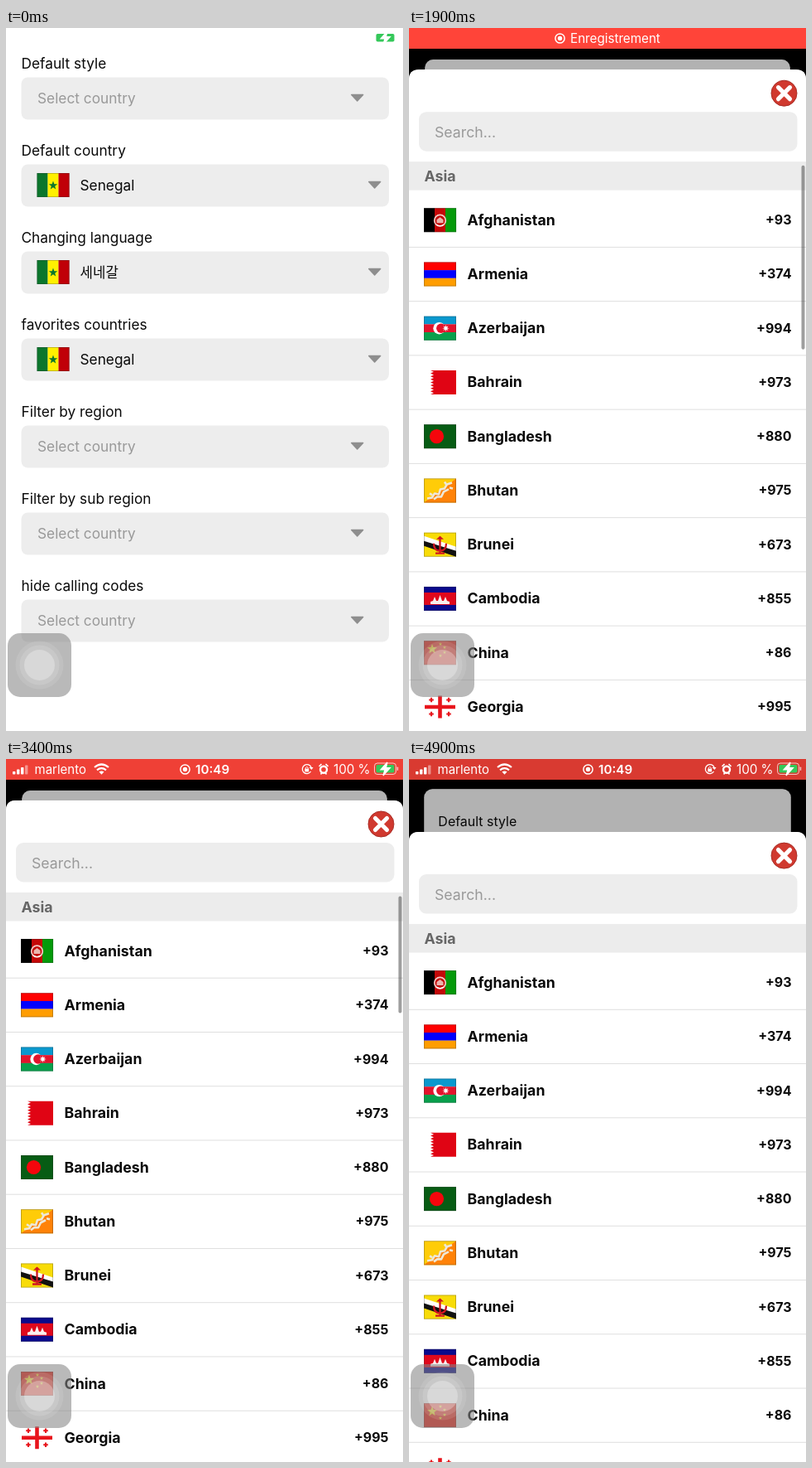
An HTML page that plays this animation: 480 px wide and 848 px high, repeating every 5 s.

```html
<!DOCTYPE html>
<html lang="en">
<head>
<meta charset="utf-8">
<title>Country picker</title>
<style>
html, body { margin: 0; width: 100%; height: 100%; overflow: hidden; background: #000; }
svg { display: block; }
#stage { width: 100vw; height: 100vh; }
text { font-family: Inter, "Noto Sans CJK KR", "Noto Sans CJK", sans-serif; white-space: pre; }
</style>
</head>
<body>
<svg id="stage" viewBox="0 0 480 848"></svg>
<script>
const LOOP = 5000, STEP = 100, TOP = 50, HEIGHT = 848, PITCH = 65.25;
const clamp = v => Math.max(0, Math.min(1, v));
const $ = id => document.getElementById(id);

// SVG helpers
const rect = (x, y, w, h, fill, more = '') => `<rect x="${x}" y="${y}" width="${w}" height="${h}" fill="${fill}" ${more}/>`;
const disc = (x, y, r, fill, more = '') => `<circle cx="${x}" cy="${y}" r="${r}" fill="${fill}" ${more}/>`;
const path = (d, fill, more = '') => `<path d="${d}" fill="${fill}" ${more}/>`;
const line = (d, color, width, more = '') => path(d, 'none', `stroke="${color}" stroke-width="${width}" ${more}`);
const text = (x, y, s, size, fill, more = '') => `<text x="${x}" y="${y}" font-size="${size}" fill="${fill}" ${more}>${s}</text>`;
const group = (body, more = '') => `<g ${more}>${body}</g>`;
const SEMI = 'font-weight="600"', BOLD = 'font-weight="700"';

// Flags on a 39 x 29 field
const W = 39, H = 29;
const columns = (...c) => c.map((f, i) => rect(i * W / c.length, 0, W / c.length + .1, H, f)).join('');
const bands = (...c) => c.map((f, i) => rect(0, i * H / c.length, W, H / c.length + .1, f)).join('');
const star = (x, y, r, fill, n = 5) => {
  let d = '';
  for (let i = 0; i < 2 * n; i++) {
    const a = Math.PI * i / n, k = i % 2 ? r * .42 : r;
    d += `${i ? 'L' : 'M'}${x + k * Math.sin(a)} ${y - k * Math.cos(a)}`;
  }
  return path(d + 'Z', fill);
};
const plus = (x, y, r, w) => line(`M${x - r} ${y}h${2 * r}M${x} ${y - r}v${2 * r}`, '#e8141c', w);
const teeth = () => {
  let d = 'M39 0H8';
  for (let i = 0; i < 8; i++) d += `l4 ${H / 16}l-4 ${H / 16}`;
  return path(d + 'H39Z', '#e00414');
};
const flags = {
  Senegal: columns('#0b762c', '#fff000', '#c00008') + star(19.5, 15, 5.5, '#0b762c'),
  Afghanistan: columns('#000', '#c40808', '#059a0a') +
    disc(19.5, 15, 6.8, 'none', 'stroke="#f3c9c4" stroke-width="1.7"') +
    path('M15.5 18v-4l4-3 4 3v4z', '#eab5ae') + line('M15 20q4.5 3 9 0', '#fff', 1.2),
  Armenia: bands('#f00', '#00f', '#ff9d00'),
  Azerbaijan: bands('#0a98ce', '#e3142c', '#08a04c') + disc(18.5, 14.5, 7.2, '#fff') +
    disc(20.8, 14.5, 5.7, '#e3142c') + star(26.5, 14.5, 4.2, '#fff', 8),
  Bahrain: teeth(),
  Bangladesh: rect(0, 0, W, H, '#075c14') + disc(15.5, 14.5, 8.6, '#f5060c'),
  Bhutan: rect(0, 0, W, H, '#ffcc08') + path('M39 0V29H0Z', '#ff8208') +
    line('M4 24l6-1 3-5 5 1 2-6 5-1 3-5 6-2M12 25l4-3 5 0 3-6 6-3M10 20l-3-2M27 7l-2-3M31 11l4 1', '#eee8d8', 2.6, 'stroke-linejoin="round"'),
  Brunei: rect(0, 0, W, H, '#f8dc08') + path('M0 4L39 17V24L0 11Z', '#fff') + path('M0 10L39 22V29L0 16Z', '#111') +
    line('M12 13q0 9 7.5 9t7.5-9M19.5 5v19M14 25h11', '#cf1620', 2.3) + path('M15 8l4.5-4 4.5 4z', '#cf1620'),
  Cambodia: rect(0, 0, W, H, '#0a0a8c') + rect(0, 7, W, 15, '#e0081c') +
    path('M8 21v-3l3-1 2-5 2 5h2l2.5-7 2.5 7h2l2-5 2 5 3 1v3z', '#f8eeee'),
  China: rect(0, 0, W, H, '#f02414') + star(10, 10, 6.3, '#ffdc10') +
    [[20, 4], [25, 8], [25, 14], [20, 18]].map(([x, y]) => star(x, y, 2.2, '#ffdc10')).join(''),
  Georgia: rect(0, 0, W, H, '#fff') + line('M1 14.5h37M19.5 1v27', '#e8141c', 4.6) +
    [[9, 6], [30, 6], [9, 23], [30, 23]].map(([x, y]) => plus(x, y, 2.8, 2.1)).join(''),
  'Hong Kong': rect(0, 0, W, H, '#d8141c') + star(19.5, 14.5, 7, '#fff')
};
const flag = (name, x, y) => {
  const edge = /Bahrain|Georgia/.test(name) ? '' : rect(.4, .4, W - .8, H - .8, 'none', 'stroke="#333" stroke-opacity=".35" stroke-width=".8"');
  return group(flags[name] + edge, `transform="translate(${x} ${y})"`);
};

// Form
const arrow = (x, y) => path(`M${x - 7} ${y - 4}h14l-7 7.5z`, '#8e8e8e', 'stroke="#8e8e8e" stroke-width="1.4" stroke-linejoin="round"');
const chosen = (name, y, label = name) =>
  flag(name, 37.5, y + 10.5) + text(89.5, y + 31.8, label, label === name ? 17.3 : 16.8, '#0a0a0a') + arrow(445.7, y + 25);
const empty = y => text(38, y + 31.8, 'Select country', 17.3, '#999') + arrow(424.7, y + 25);
const fields = [
  ['Default style', y => group(empty(y), 'id="before"') + group(chosen('Azerbaijan', y), 'id="after"')],
  ['Default country', y => chosen('Senegal', y)],
  ['Changing language', y => chosen('Senegal', y, '세네갈')],
  ['favorites countries', y => chosen('Senegal', y)],
  ['Filter by region', empty],
  ['Filter by sub region', empty],
  ['hide calling codes', empty]
];
const form = rect(0, 0, 480, HEIGHT, '#fff', 'id="card"') + fields.map(([label, draw], i) => {
  const y = 59.5 + 105 * i;
  return text(18.5, y - 11, label, 17.3, '#0a0a0a') + rect(18.5, y, 444.5, 51, '#ededed', 'rx="8"') + draw(y);
}).join('') + rect(0, 0, 480, HEIGHT, '#000', 'id="dim"');

// Sheet
const codes = { Afghanistan: 93, Armenia: 374, Azerbaijan: 994, Bahrain: 973, Bangladesh: 880, Bhutan: 975,
  Brunei: 673, Cambodia: 855, China: 86, Georgia: 995, 'Hong Kong': 852 };
const rows = Object.entries(codes).map(([name, code], i) => {
  const y = 181.5 + PITCH * i;
  return flag(name, 18, y - 14.5) + text(70.5, y + 6, name, 17.8, '#0a0a0a', BOLD) +
    text(462.5, y + 5.5, '+' + code, 16, '#0a0a0a', BOLD + ' text-anchor="end"') +
    rect(0, y + 32.2, 480, 1, '#dfdfdf');
}).join('');
const sheet = path('M0 820V12Q0 0 12 0H468Q480 0 480 12V820Z', '#fff') + group(rows, 'id="rows"') +
  path('M0 111V12Q0 0 12 0H468Q480 0 480 12V111Z', '#fff') +
  disc(453.5, 28.5, 15.5, '#d0392f', 'stroke="#a82c25" stroke-width="1"') +
  line('M446.5 21.5l14 14m0-14l-14 14', '#fff', 5.2, 'stroke-linecap="round"') +
  rect(12, 51, 457.5, 47.5, '#ededed', 'rx="9"') + text(31, 81.5, 'Search...', 17.7, '#999') +
  rect(0, 111, 480, 34.5, '#ececec') + text(18.5, 135, 'Asia', 17.8, '#666', BOLD) +
  rect(474.5, 116, 4, 222, '#000', 'id="thumb" rx="2" opacity=".38"');

// Status bar
const record = x => disc(x, 12.5, 5.6, 'none', 'stroke="#fff" stroke-width="1.5"') + disc(x, 12.5, 2.7, '#fff');
const signal = [0, 1, 2, 3].map(i => rect(8 + 5 * i, 15 - 2.5 * i, 3.4, 3.5 + 2.5 * i, '#fff', `rx=".8" opacity="${i > 2 ? .45 : 1}"`)).join('');
const wifi = line('M107 10q8.5-7 17 0M110 13.3q5.5-4.4 11 0', '#fff', 2.2) + path('M112.5 15.6q3-2.2 6 0l-3 3.2z', '#fff');
const lock = line('M368.5 15a5.5 5.5 0 1 1 .6-4.5', '#fff', 1.3) + path('M366.5 10h5l-2 3z', '#fff') +
  rect(361.3, 11.8, 4.8, 3.6, '#fff') + line('M362.3 12v-1.5q1.4-2 2.8 0v1.5', '#fff', 1);
const alarm = disc(384, 12.8, 4, 'none', 'stroke="#fff" stroke-width="2.4"') +
  line('M378.5 9l3-3M389.5 9l-3-3M380.5 18.5l1.5-2M387.5 18.5l-1.5-2', '#fff', 1.7);
const battery = rect(445.5, 5, 26, 13.5, 'none', 'rx="3.5" stroke="#fff" opacity=".7"') + rect(447.5, 7, 22, 9.5, '#35c85a', 'rx="1.8"') +
  rect(472.7, 9.5, 1.5, 4.5, '#fff', 'rx=".7" opacity=".7"') + path('M461 4l-8 9h5l-2 7 8.5-9.5h-5z', '#fff', 'stroke="#fff" stroke-width="1.2"');
const bar = rect(0, 0, 480, 25, '#f00', 'id="red"') +
  group(record(182.5) + text(195, 17.8, 'Enregistrement', 15.2, '#fff'), 'id="notice"') +
  group(signal + text(34.5, 17.8, 'marlento', 15, '#fff') + wifi + record(216.5) +
    text(229, 17.8, '10:49', 15.2, '#fff', SEMI) + lock + alarm + text(396, 17.8, '100 %', 15.2, '#fff') + battery, 'id="status"');

const assist = rect(2, 730, 77, 77, '#858585', 'rx="15" opacity=".57"') +
  disc(40.5, 768.5, 29, '#fff', 'opacity=".1"') + disc(40.5, 768.5, 24, '#fff', 'opacity=".13"') + disc(40.5, 768.5, 18.5, '#fff', 'opacity=".28"');

$('stage').innerHTML = rect(0, 0, 480, HEIGHT, '#000') + group(form, 'id="form"') + group(sheet, 'id="sheet"') + bar + assist;

const set = (id, key, value) => $(id).setAttribute(key, value);
const show = (id, on) => set(id, 'visibility', on ? 'visible' : 'hidden');

// Critically damped spring from 0 to 1
const spring = (t, start) => {
  const x = Math.max(0, t - start) * .012;
  return 1 - (1 + x) * Math.exp(-x);
};

function render(t) {
  const open = t < 3494 ? spring(t, 1000) : t < 4500 ? 1 - spring(t, 3494) : spring(t, 4500);
  const scale = 1 - .08 * open;
  set('form', 'transform', `translate(${240 * (1 - scale)} ${38 * open}) scale(${scale})`);
  for (const id of ['card', 'dim']) set(id, 'rx', 11 * clamp(open * 8));
  set('dim', 'opacity', .3 * clamp((open - .3) / .55));
  set('sheet', 'transform', `translate(0 ${HEIGHT - (HEIGHT - TOP) * open})`);
  show('before', t < 3500);
  show('after', t >= 3500);

  const scroll = 24 * Math.sin(Math.PI * clamp((t - 2300) / 1000)) ** 2;
  const loaded = t >= 2200;
  set('rows', 'transform', `translate(0 ${-scroll})`);
  set('thumb', 'y', 115.5 + scroll * .19);
  set('thumb', 'height', loaded ? 141 : 222);
  show('thumb', t >= 1700 && t < 4400);

  const glow = Math.cos((t - 1850) / 1000 * Math.PI);
  set('red', 'fill', `rgb(${236 + 19 * glow},${63 + 5 * glow},${53 + 4 * glow})`);
  const recording = t >= 300, notice = recording && t < 3200;
  show('red', recording);
  show('notice', notice);
  show('status', !notice);
}

const begin = performance.now();
function tick() {
  const t = (performance.now() - begin) % LOOP;
  render(Math.floor(t / STEP) * STEP);
  requestAnimationFrame(tick);
}
tick();
</script>
</body>
</html>
```
